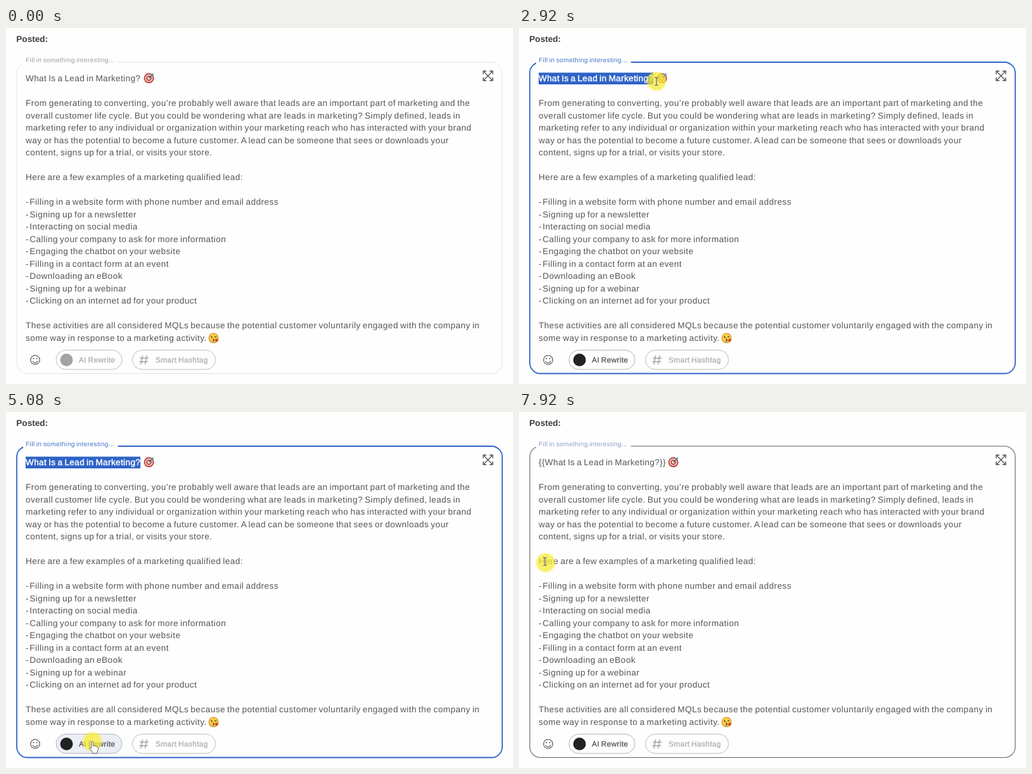
Write an HTML page with a canvas that moves like this. It is 800 px wide and 562 px high and loops after 8000 ms.

```html
<!DOCTYPE html>
<html lang="en">
<head>
<meta charset="utf-8">
<title>Post editor</title>
<style>
  html, body { margin: 0; width: 100%; height: 100%; overflow: hidden; background: #fefefe; }
  canvas { display: block; }
</style>
</head>
<body>
<canvas id="stage" width="800" height="562"></canvas>
<script>
const ctx = document.getElementById('stage').getContext('2d');
const LOOP = 8000, STEP = 1000 / 12;
const SANS = '"Liberation Sans", Arial, sans-serif';
const INK = '#565656', BLUE = '#2f66c8', GREY = '#adadad';
const LEFT = 31, BULLET = 37.3, SIZE = 13.6, BASE = 84, PITCH = 19.52;
const TITLE = 'What Is a Lead in Marketing?';
const FOCUS = 1750, ENABLE = 2750, CLICK = 5330;

const lines = [
  '', '',
  'From generating to converting, you’re probably well aware that leads are an important part of marketing and the',
  'overall customer life cycle. But you could be wondering what are leads in marketing? Simply defined, leads in',
  'marketing refer to any individual or organization within your marketing reach who has interacted with your brand',
  'way or has the potential to become a future customer. A lead can be someone that sees or downloads your',
  'content, signs up for a trial, or visits your store.',
  '',
  'Here are a few examples of a marketing qualified lead:',
  '',
  '-Filling in a website form with phone number and email address',
  '-Signing up for a newsletter',
  '-Interacting on social media',
  '-Calling your company to ask for more information',
  '-Engaging the chatbot on your website',
  '-Filling in a contact form at an event',
  '-Downloading an eBook',
  '-Signing up for a webinar',
  '-Clicking on an internet ad for your product',
  '',
  'These activities are all considered MQLs because the potential customer voluntarily engaged with the company in',
  'some way in response to a marketing activity.'
];

// Pointer path: time, x, y
const path = [
  [667, -24, 118], [917, 10, 110], [1167, 33, 96], [1500, 23, 80], [1750, 23, 80],
  [1830, 31, 80], [2167, 135, 81], [2420, 214, 82], [2900, 217, 84], [3330, 214, 92],
  [3600, 198, 140], [3833, 178, 198], [4000, 165, 310], [4167, 152, 480], [4250, 148, 526],
  [4500, 142, 533], [5083, 136, 520], [5920, 138, 519], [6330, 143, 517], [6917, 143, 517],
  [7170, 147, 508], [7250, 148, 490], [7500, 110, 380], [7750, 53, 256], [7917, 41, 236]
];

function pointer(t) {
  const i = path.findIndex(k => k[0] > t);
  if (i === 0) return path[0].slice(1);
  if (i < 0) return path[path.length - 1].slice(1);
  const [t0, x0, y0] = path[i - 1], [t1, x1, y1] = path[i];
  const p = (t - t0) / (t1 - t0);
  return [x0 + (x1 - x0) * p, y0 + (y1 - y0) * p];
}

const inBox = ([x, y]) => x > 17 && x < 783 && y > 54 && y < 545;
const inButton = ([x, y]) => x > 79 && x < 183 && y > 508 && y < 539;

function setFont(size, weight = 400, track = 0.033) {
  ctx.font = `${weight} ${size}px ${SANS}`;
  ctx.textRendering = 'geometricPrecision';
  ctx.letterSpacing = `${track * size}px`;
  ctx.wordSpacing = `${track ? -0.081 * size : 0}px`;
}

function text(str, x, y, color, stroke = 0) {
  ctx.fillStyle = color;
  ctx.fillText(str, x, y);
  if (stroke) {
    ctx.lineWidth = stroke;
    ctx.strokeStyle = color;
    ctx.strokeText(str, x, y);
  }
}

function disc(x, y, r, color) {
  ctx.fillStyle = color;
  ctx.beginPath();
  ctx.arc(x, y, r, 0, Math.PI * 2);
  ctx.fill();
}

// Each polyline is a flat list of x, y pairs
function strokes(color, width, ...polys) {
  ctx.strokeStyle = color;
  ctx.lineWidth = width;
  ctx.beginPath();
  for (const p of polys)
    for (let i = 0; i < p.length; i += 2) ctx[i ? 'lineTo' : 'moveTo'](p[i], p[i + 1]);
  ctx.stroke();
}

function frame(color, width) {
  ctx.save();
  ctx.beginPath();
  ctx.rect(0, 0, 800, 562);
  ctx.rect(27, 44, 149.5, 18);
  ctx.clip('evenodd');
  ctx.beginPath();
  ctx.roundRect(17, 54, 766, 491.5, 17);
  ctx.strokeStyle = color;
  ctx.lineWidth = width;
  ctx.stroke();
  ctx.restore();
}

function pill(x, w, fill, edge) {
  ctx.beginPath();
  ctx.roundRect(x, 508.5, w, 30.5, 15.2);
  ctx.fillStyle = fill;
  ctx.fill();
  ctx.strokeStyle = edge;
  ctx.lineWidth = 1;
  ctx.stroke();
}

function dartboard(x, y) {
  disc(x, y + 0.3, 8, '#b9443b');
  disc(x, y + 0.3, 6, '#f3e4e2');
  disc(x, y + 0.3, 4.4, '#c04a41');
  disc(x, y + 0.3, 2.4, '#f3e4e2');
  strokes('#3b4c5e', 1.2, [x, y + 0.5, x + 5, y - 4.5]);
  strokes('#4a93b8', 2.4, [x + 3.8, y - 3.5, x + 7, y - 6.5]);
}

function kissFace(x, y) {
  disc(x, y, 8, '#c98d24');
  disc(x, y, 7.2, '#f6bd38');
  disc(x - 0.5, y - 1, 5.6, '#fbcd4c');
  disc(x - 3, y - 1.6, 1.2, '#4b3320');
  strokes('#4b3320', 1.1, [x + 1.5, y - 1.4, x + 3, y - 2.3, x + 4.6, y - 1.4],
    [x - 1, y + 1.2, x + 0.7, y + 2.1, x - 0.4, y + 3, x + 0.7, y + 4, x - 1, y + 4.9]);
  disc(x + 3.9, y + 2.7, 1.5, '#d2402f');
  disc(x + 6, y + 3, 1.5, '#d2402f');
  ctx.beginPath();
  ctx.moveTo(x + 2.6, y + 3.4);
  ctx.lineTo(x + 7.3, y + 3.8);
  ctx.lineTo(x + 4.5, y + 6.2);
  ctx.fill();
}

function smiley(x, y) {
  ctx.strokeStyle = '#606060';
  ctx.lineWidth = 1.3;
  ctx.beginPath();
  ctx.arc(x, y, 7.2, 0, Math.PI * 2);
  ctx.moveTo(x + 3.7, y + 1.8);
  ctx.arc(x, y + 1, 3.8, 0.2, Math.PI - 0.2);
  ctx.stroke();
  disc(x - 2.6, y - 2.2, 1.1, '#606060');
  disc(x + 2.6, y - 2.2, 1.1, '#606060');
}

function expandIcon(x, y) {
  const r = 7.5, a = 5;
  strokes('#484848', 1.2, [x - r, y - r, x + r, y + r], [x + r, y - r, x - r, y + r]);
  for (const sx of [-1, 1]) for (const sy of [-1, 1]) {
    const cx = x + sx * r, cy = y + sy * r;
    strokes('#484848', 1.3, [cx - sx * a, cy, cx, cy, cx, cy - sy * a]);
  }
}

function hashIcon(x, y) {
  strokes('#a6a6a6', 1.5, [x - 2, y - 7, x - 4.5, y + 7], [x + 4.5, y - 7, x + 2, y + 7],
    [x - 6.5, y - 2.7, x + 7.5, y - 2.7], [x - 7.5, y + 2.7, x + 6.5, y + 2.7]);
}

function beam(x, y) {
  const shape = [
    [x - 3, y - 6.5, x - 0.8, y - 6, x, y - 5, x + 0.8, y - 6, x + 3, y - 6.5],
    [x, y - 5, x, y + 5],
    [x - 3, y + 6.5, x - 0.8, y + 6, x, y + 5, x + 0.8, y + 6, x + 3, y + 6.5]
  ];
  strokes('rgba(255,255,255,.6)', 2.4, ...shape);
  strokes('#4c4c38', 1.1, ...shape);
}

const handShape = new Path2D('M-1.5 1 Q0-1 1.6 1 V8 Q3.5 6.4 4.7 8.2 Q6.7 7 7.7 9 ' +
  'Q10 8.4 10.2 10.8 V14 Q10 16.5 8.5 18 V20.5 H0.5 V18.5 L-4.3 12.5 Q-5 10 -2.8 10.6 L-1.5 12 Z');

function hand(x, y) {
  ctx.save();
  ctx.translate(x, y);
  ctx.scale(0.92, 0.92);
  ctx.fillStyle = '#fff';
  ctx.fill(handShape);
  ctx.strokeStyle = '#555';
  ctx.lineWidth = 1;
  ctx.stroke(handShape);
  ctx.restore();
}

function drawTitle(t) {
  setFont(SIZE, 400, 0.026);
  if (t >= CLICK) {
    text(`{{${TITLE}}}`, LEFT, BASE, INK);
    dartboard(243.5, 79);
    return;
  }
  text(TITLE, LEFT, BASE, INK);
  dartboard(225.5, 79);
  if (t < FOCUS) return;
  // Selection snaps to whole letters and stays once the drag has ended
  const reach = t > 2500 ? 999 : pointer(t - 34)[0] - LEFT;
  let n = 0;
  while (n < TITLE.length && ctx.measureText(TITLE.slice(0, n + 1)).width <= reach) n++;
  if (!n) return;
  const w = ctx.measureText(TITLE.slice(0, n)).width;
  ctx.save();
  ctx.beginPath();
  ctx.rect(LEFT, 70.5, w, 18.5);
  ctx.clip();
  ctx.fillStyle = '#2e63c6';
  ctx.fillRect(LEFT, 70, w, 20);
  text(TITLE, LEFT, BASE, '#fff', 0.45);
  ctx.restore();
}

function drawLine(str, i) {
  const y = BASE + PITCH * i;
  if (str[0] !== '-') return text(str, LEFT, y, INK);
  text('-', LEFT, y, INK);
  text(str.slice(1), BULLET, y, INK);
}

function hoverAmount(t) {
  let a = 0;
  for (let s = t - 250; s <= t; s += 25) if (inButton(pointer(s))) a++;
  return a / 11;
}

function drawButtons(t) {
  const on = t >= ENABLE;
  const h = on ? hoverAmount(t) : 0;
  const tint = v => Math.round(254 + (v - 254) * h);
  pill(79, 104, `rgb(${tint(235)},${tint(238)},${tint(245)})`, on ? '#b0b3b8' : '#bdbdbd');
  pill(199.5, 131, '#fefefe', '#bdbdbd');
  disc(95.5, 524, 10, on ? '#222' : '#a3a3a3');
  hashIcon(217.5, 524);
  setFont(11.9, 400, 0.028);
  text('AI Rewrite', 115, 528, on ? '#555' : GREY, 0.3);
  text('Smart Hashtag', 236, 528, GREY, 0.3);
  smiley(46, 524);
}

function drawPointer(t) {
  if (t < 740) return;
  const p = pointer(t), [gx, gy] = pointer(t - 14);
  const glow = ctx.createRadialGradient(gx, gy, 13, gx, gy, 16.5);
  glow.addColorStop(0, 'rgba(248,236,48,.74)');
  glow.addColorStop(1, 'rgba(248,236,48,0)');
  disc(gx, gy, 17, glow);
  if (inButton(p) && t >= ENABLE) hand(...p);
  else beam(...p);
}

function draw(t) {
  ctx.fillStyle = '#fefefe';
  ctx.fillRect(0, 0, 800, 562);
  const p = pointer(t);
  const focused = t >= FOCUS && t < CLICK;
  const hovered = inBox(p) && !inButton(p);

  setFont(SIZE, 700, 0);
  text('Posted:', 16.3, 21.5, '#3d3d3d');

  if (focused) frame(BLUE, 1.8);
  else if (hovered) frame('#5e5e5e', 1.1);
  else frame('#e3e3e6', 1);

  setFont(10.2);
  text('Fill in something interesting...', LEFT, 54, focused ? '#4373c8' : t >= CLICK ? '#8b9dc6' : '#9d9d9d');

  drawTitle(t);
  setFont(SIZE);
  lines.forEach(drawLine);
  kissFace(327.5, 489.5);
  expandIcon(760.5, 75.5);
  drawButtons(t);
  drawPointer(t);
}

const start = performance.now();
function tick() {
  const t = (performance.now() - start) % LOOP;
  draw(Math.floor((t + 4) / STEP) * STEP);
  requestAnimationFrame(tick);
}
ctx.lineJoin = 'round';
tick();
</script>
</body>
</html>
```
